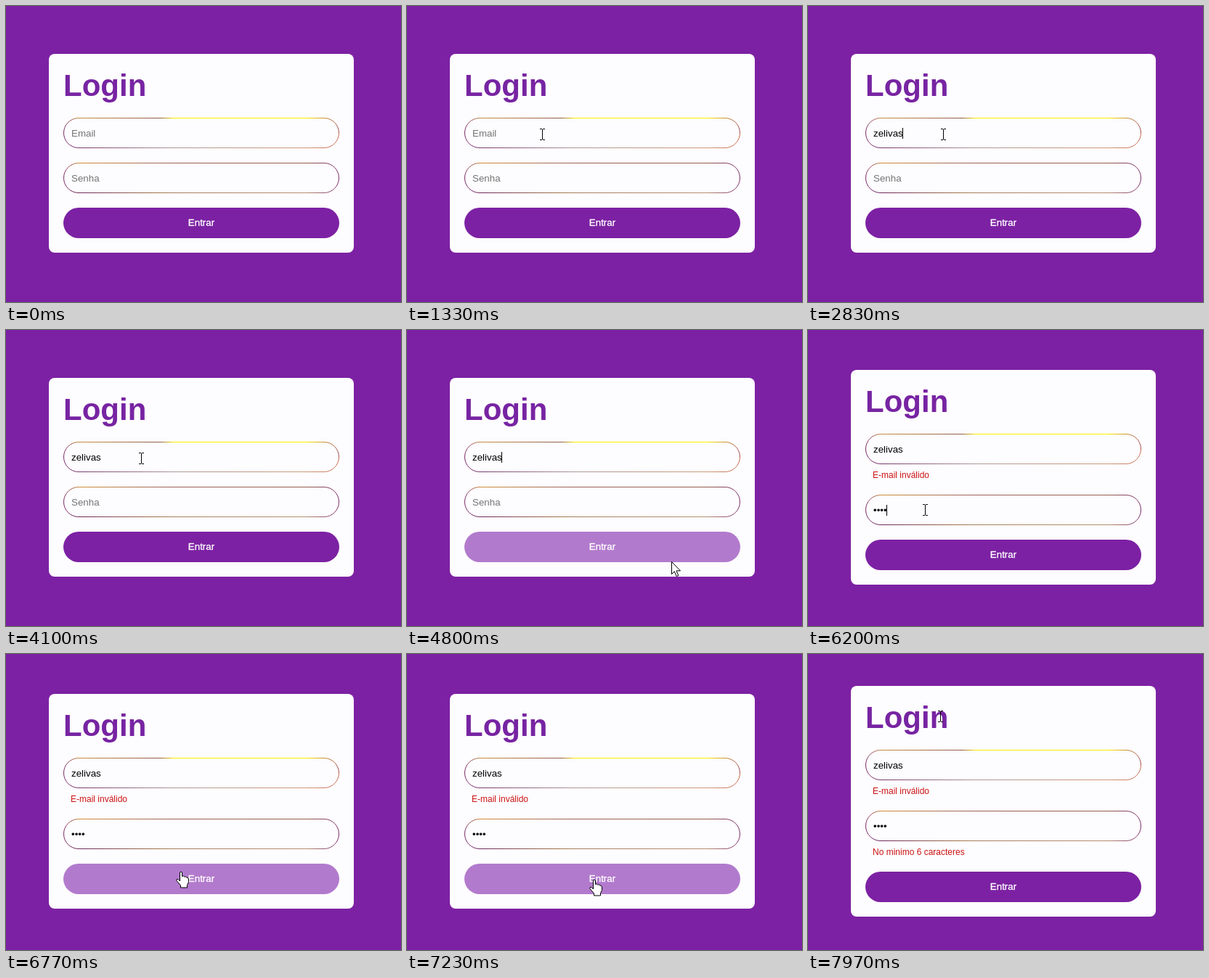
Animation, 544 px wide and 408 px high, one loop 8000 ms. Source, as an HTML page:

```html
<!DOCTYPE html>
<html lang="pt">
<head>
<meta charset="utf-8">
<title>Login</title>
<style>
  html, body { margin: 0; width: 100%; height: 100%; overflow: hidden; background: #7c21a3; }
  svg { display: block; width: 544px; height: 408px; cursor: default; }
  text { font: 13.333px "Liberation Sans", Arial, sans-serif; white-space: pre; }
  .title { font-size: 42px; font-weight: bold; fill: #7724a2; }
  .error { font-size: 12px; fill: #cc1414; }
  .caret { fill: #000; shape-rendering: crispEdges; }
  .edge { fill: none; stroke-width: 1; }
  .action { fill: #fff; stroke: #fff; stroke-width: .3; text-anchor: middle; }
</style>
</head>
<body>
<svg id="stage" viewBox="0 0 544 408" xmlns="http://www.w3.org/2000/svg">
  <defs id="defs"></defs>
  <g id="card">
    <rect id="panel" x="59" width="420" rx="8" fill="#fdfcfe"/>
    <text class="title" x="79" y="58">Login</text>
    <g id="email"></g>
    <text id="emailError" class="error" x="89" y="149">E-mail inválido</text>
    <g id="pass"></g>
    <text id="passError" class="error" x="89" y="233">No minimo 6 caracteres</text>
    <g id="button">
      <rect id="pill" x="79" width="380" height="42" rx="21"/>
      <text class="action" x="269" y="25">Entrar</text>
    </g>
  </g>
  <g id="pointer">
    <path id="arrow" d="M.5.5V17.5L4.3 13.8 7.2 20.5 9.8 19.4 7 12.9H12.5Z" fill="#fff" stroke="#000"/>
    <path id="hand" d="M-1.5 1Q0-.5 1.5 1V6.5Q3.5 5 4.5 7 6.5 6 7.5 8 9.5 7.5 10.5 10V14.5L8.5 18.5V22H-.5V19L-6 12.5Q-6.5 9.5-4 10.5L-1.5 13Z" fill="#fff" stroke="#000"/>
    <path id="beam" d="M-3-7.5H0M1-7.5H4M.5-7V7M-3 7.5H0M1 7.5H4" fill="none" stroke="#000" shape-rendering="crispEdges"/>
  </g>
</svg>
<script>
const LOOP = 8000;
const USER = "zelivas";
const $ = id => document.getElementById(id);
const show = (el, on) => el.setAttribute("visibility", on ? "visible" : "hidden");

// Border tints, left to right, for the top and bottom half of a field
const STOPS = [0, .06, .35, .4, .88, 1];
const TINTS = {
  email: ["#7b2d6b #c89040 #8f5c4c #fff000 #fff000 #a04a50", "#7b2d6b #7b3a70 #a58a92 #b09a9a #d09a78 #c86a50"],
  pass: ["#7b2d6b #d09038 #a0685a #9c6258 #94604e #7b2d6b", "#7b2d6b #6e2a5c #a07848 #a88060 #b89070 #7b2d6b"]
};
$("defs").innerHTML = Object.entries(TINTS).map(([name, halves]) =>
  halves.map((colors, i) =>
    `<linearGradient id="${name}${i}" gradientUnits="userSpaceOnUse" x1="79" x2="459" y1="0" y2="0">` +
    colors.split(" ").map((c, k) => `<stop offset="${STOPS[k]}" stop-color="${c}"/>`).join("") +
    "</linearGradient>").join("")).join("");

function makeField(id, hint) {
  const g = $(id);
  g.innerHTML =
    `<path class="edge" stroke="url(#${id}0)" d="M79.5 21A20.5 20.5 0 0 1 100 .5H438A20.5 20.5 0 0 1 458.5 21"/>
     <path class="edge" stroke="url(#${id}1)" d="M79.5 21A20.5 20.5 0 0 0 100 41.5H438A20.5 20.5 0 0 0 458.5 21"/>
     <text x="90" y="26"></text><rect class="caret" y="14" width="1" height="15"/>`;
  const label = g.querySelector("text");
  const caret = g.querySelector(".caret");
  return (y, value, caretOn) => {
    g.setAttribute("transform", `translate(0 ${y})`);
    const text = value || hint;
    if (label.textContent !== text) label.textContent = text;
    label.setAttribute("fill", value ? "#000" : "#757575");
    const end = value ? label.getComputedTextLength() : 0;
    caret.setAttribute("x", Math.floor(90 + end));
    show(caret, caretOn);
  };
}
const drawEmail = makeField("email", "Email");
const drawPass = makeField("pass", "Senha");

// Pointer stops: time, x, y
const PATH = [
  [100, -12, 262], [700, 186, 177], [4500, 186, 177], [4800, 364, 319],
  [4930, 352, 306], [5330, 352, 306], [5690, 161, 248], [6330, 161, 248],
  [6930, 258, 311], [7470, 258, 311], [7950, 182, 86]
];
const EMAIL_CARET = [[970, 1330], [1730, 2130], [2200, 3270], [3670, 4100], [4500, 5040]];
const PASS_CARET = [[5700, 6530], [6930, 7060]];

const within = (t, spans) => spans.some(([a, b]) => t >= a && t < b);
const typed = (t, start, gap, max) => Math.max(0, Math.min(max, Math.floor((t - start) / gap) + 1));

function pointerAt(t) {
  const next = PATH.findIndex(p => p[0] > t);
  if (next < 1) return (next ? PATH[PATH.length - 1] : PATH[0]).slice(1);
  const [t0, x0, y0] = PATH[next - 1], [t1, x1, y1] = PATH[next];
  const k = (t - t0) / (t1 - t0), e = k * k * (3 - 2 * k);
  return [Math.round(x0 + (x1 - x0) * e), Math.round(y0 + (y1 - y0) * e)];
}

function draw(t) {
  const badEmail = t >= 5040, badPass = t >= 7270;
  const errors = badEmail + badPass;
  const top = 66 - 11 * errors;
  const passY = badEmail ? 172 : 150, buttonY = 212 + 22 * errors;

  $("card").setAttribute("transform", `translate(0 ${top})`);
  $("panel").setAttribute("height", 274 + 22 * errors);
  $("button").setAttribute("transform", `translate(0 ${buttonY})`);
  show($("emailError"), badEmail);
  show($("passError"), badPass);

  drawEmail(88, USER.slice(0, typed(t, 2200, 105, USER.length)), within(t, EMAIL_CARET));
  drawPass(passY, "•".repeat(typed(t, 5800, 110, 4)), within(t, PASS_CARET));

  const [x, y] = pointerAt(t);
  const over = (left, right, from, to) => x >= left && x <= right && y >= top + from && y <= top + to;
  const hover = over(79, 459, buttonY, buttonY + 42);
  const hand = over(79, 459, buttonY, buttonY + 40);
  const beam = over(79, 459, 88, 130) || over(79, 459, passY, passY + 42) || over(79, 193, 25, 75);
  $("pill").setAttribute("fill", hover ? "#b27acd" : "#7c21a3");
  $("pointer").setAttribute("transform", `translate(${x} ${y})`);
  const shown = t >= 100;
  show($("hand"), shown && hand);
  show($("beam"), shown && beam);
  show($("arrow"), shown && !hand && !beam);
}

const start = performance.now();
function tick() {
  draw((performance.now() - start) % LOOP);
  requestAnimationFrame(tick);
}
tick();
</script>
</body>
</html>
```
